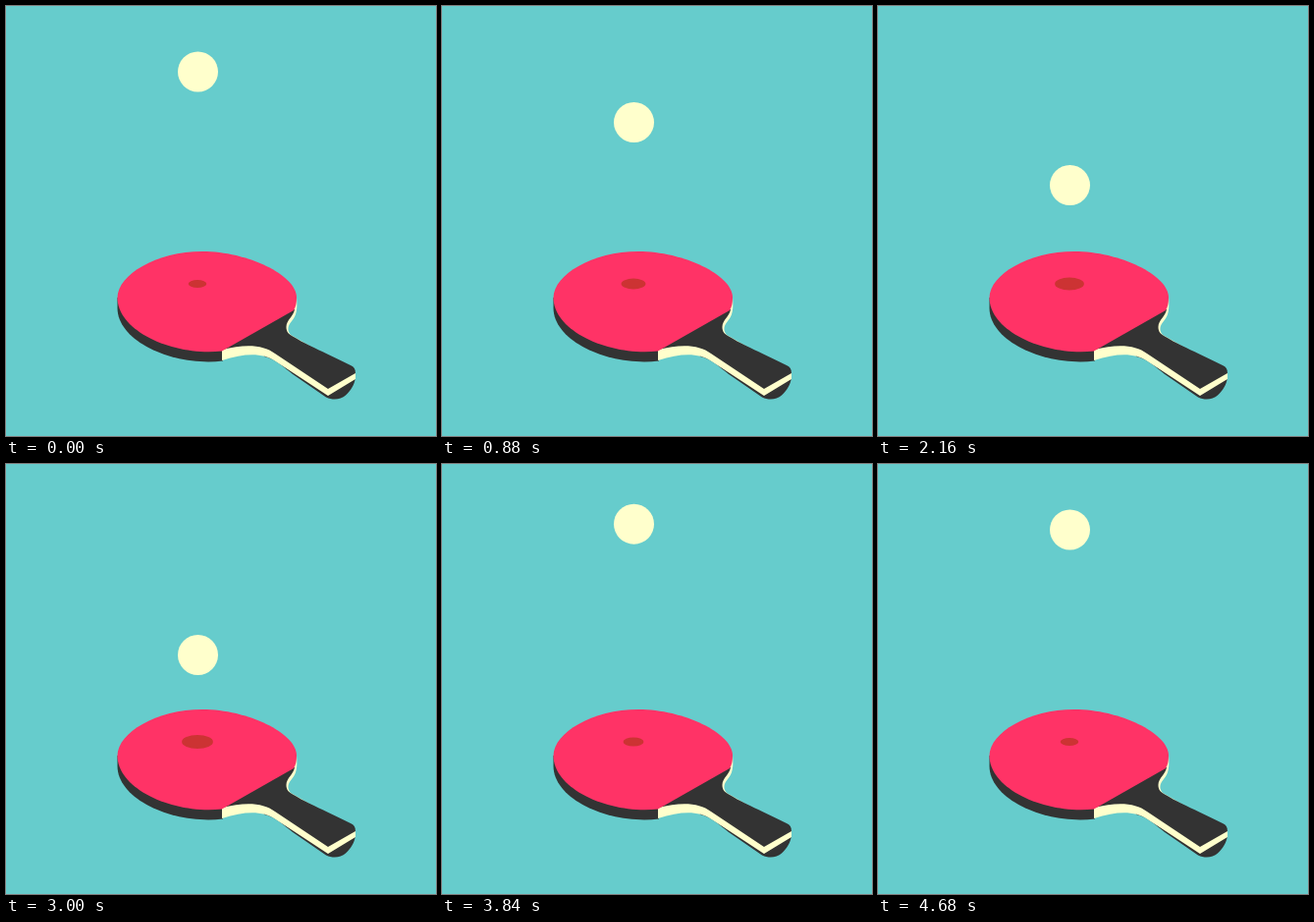
Recreate the animation shown at these times as an HTML page with a canvas. Size 438 by 438 pixels, loop 4720 ms.

```html
<!DOCTYPE html>
<html lang="en">
<head>
<meta charset="utf-8">
<title>Bouncing ball</title>
<style>
  html, body { margin: 0; width: 100%; height: 100%; overflow: hidden; background: #66cccc; }
  canvas { display: block; width: 438px; height: 438px; }
</style>
</head>
<body>
<canvas id="stage" width="438" height="438"></canvas>
<script>
const ctx = document.getElementById('stage').getContext('2d');
const LOOP = 4720, STEP = 40;
const BALL_X = 195.5, BALL_R = 20.5, FLOOR = 265;
const SPOT = { x: 195, y: 283, max: 36, ratio: 0.435 };
const COLORS = { sky: '#66cccc', cream: '#ffffcc', rubber: '#ff3366', dark: '#333333', spot: '#cc3333' };

// Each arc: peak time, peak height, spot width at the peak, half duration, hold at the peak
const arcs = [
  { at: 40, top: 67, spot: 18.5, half: 320, hold: 80 },
  { at: 760, top: 104, spot: 23.8, half: 400 },
  { at: 1560, top: 129.2, spot: 24.9, half: 400 },
  { at: 2360, top: 155, spot: 27.7, half: 400 },
  { at: 3160, top: 181, spot: 31, half: 400 },
  { at: 3960, top: 41, spot: 19.4, half: 400 },
  { at: 4760, top: 67, spot: 18.5, half: 320, hold: 80 }
];

const bladeSide = new Path2D(
  'M113.5 297 L113.5 307.5 C113.5 342.5 172 367.5 221 361.5 L221 345 L200 300 Z');
const handleBase = new Path2D(
  'M262 354 L327 394 L356 378 C355 386 351 392 346 396.5 C341 401 333 402 326 398.5 ' +
  'L292 375 C283 368 275 360 263 357 Z');
const trim = new Path2D(
  'M220 346 L286 309 L296 297 C297 309 296 315 291 321 C287 326 286 330 290 335 ' +
  'L356 373 L356 380 L328 397 L274 361.5 C262 353.5 244 353 220 361 Z');
const handle = new Path2D(
  'M220 350 L286 309 L294 309 C293 316 285.5 320 285.5 327 C285.5 332 288 334.5 293 337 ' +
  'C304 344 330 355.5 351 366 C354.5 367.5 356 370 356 374 L328 390 L274 354 C262 345 244 344 220 350 Z');
const face = new Path2D(
  'M113.5 297 C113.5 274 153 250 200 250 C246 250 296 274 296 297 C296 303 295 307 293 310 ' +
  'L220 351.5 C172 357 113.5 332 113.5 297 Z');

function fill(path, color) {
  ctx.fillStyle = color;
  ctx.fill(path);
}

function ellipse(x, y, rx, ry, color) {
  ctx.fillStyle = color;
  ctx.beginPath();
  ctx.ellipse(x, y, rx, ry, 0, 0, Math.PI * 2);
  ctx.fill();
}

function ballState(t) {
  for (const { at, top, spot, half, hold = 0 } of arcs) {
    const offset = t < at - hold ? t - at + hold : Math.max(0, t - at);
    const phase = offset / half;
    if (phase > 1) continue;
    const fall = phase * phase;
    return { y: top + (FLOOR - top) * fall, spot: spot + (SPOT.max - spot) * fall };
  }
}

const ease = x => x * x * (3 - 2 * x);
const clamp = x => Math.min(1, Math.max(0, x));

// Wind up before the strike, then swing back through the contact
function batSwing(t) {
  return ease(clamp((t - 3200) / 180)) * (1 - ease(clamp((t - 3400) / 200)));
}

function drawBat(t) {
  const swing = batSwing(t);
  ctx.save();
  ctx.translate(205 - 2 * swing, 305);
  ctx.rotate(-0.12 * swing);
  ctx.translate(-205, -305);
  fill(bladeSide, COLORS.dark);
  fill(handleBase, COLORS.dark);
  fill(trim, COLORS.cream);
  fill(handle, COLORS.dark);
  fill(face, COLORS.rubber);
  ctx.restore();
}

function draw(t) {
  const ball = ballState(t);
  ctx.fillStyle = COLORS.sky;
  ctx.fillRect(0, 0, 438, 438);
  drawBat(t);
  ellipse(SPOT.x, SPOT.y, ball.spot / 2, ball.spot * SPOT.ratio / 2, COLORS.spot);
  ellipse(BALL_X, ball.y, BALL_R, BALL_R, COLORS.cream);
}

const start = performance.now();
function tick() {
  const t = (performance.now() - start) % LOOP;
  draw(Math.floor(t / STEP) * STEP);
  requestAnimationFrame(tick);
}
tick();
</script>
</body>
</html>
```
